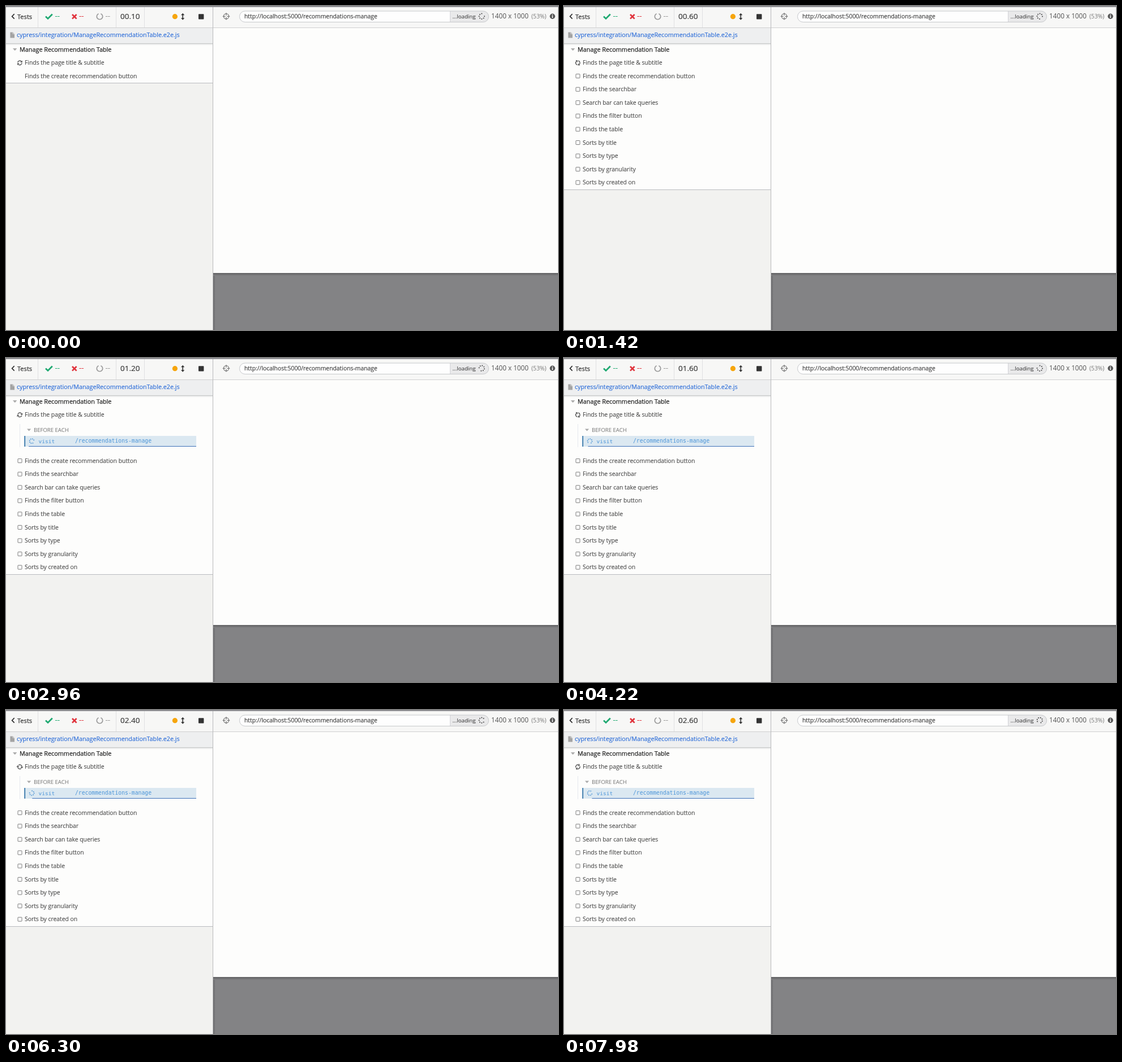
These frames come from a looping animation (975x574 px, 8000 ms). An HTML page:

```html
<!DOCTYPE html>
<html lang="en">
<head>
<meta charset="utf-8">
<title>Test runner</title>
<style>
html, body { margin: 0; width: 100%; height: 100%; overflow: hidden; background: #f2f2f0; }
svg { display: block; width: 975px; height: 574px; }
text { font-family: "Open Sans", "Noto Sans", sans-serif; white-space: pre; }
.mono { font-family: "DejaVu Sans Mono", monospace; }
</style>
</head>
<body>
<svg id="stage" viewBox="0 0 975 574" xmlns="http://www.w3.org/2000/svg"></svg>
<script>
const LOOP = 8000;
const ROW = 23.58;
const VISIT_GAP = 58;
const VISIT_FRAME = 43;
const tests = [
  'Finds the page title & subtitle', 'Finds the create recommendation button',
  'Finds the searchbar', 'Search bar can take queries', 'Finds the filter button',
  'Finds the table', 'Sorts by title', 'Sorts by type', 'Sorts by granularity',
  'Sorts by created on'
];

const esc = s => s.replace(/&/g, '&amp;');
const rect = (x, y, w, h, fill, extra = '') =>
  `<rect x="${x}" y="${y}" width="${w}" height="${h}" fill="${fill}" ${extra}/>`;
const text = (x, y, size, fill, s, extra = '') =>
  `<text x="${x}" y="${y}" font-size="${size}" fill="${fill}" ${extra}>${esc(s)}</text>`;
const line = (d, stroke, w = 1, extra = '') =>
  `<path d="${d}" fill="none" stroke="${stroke}" stroke-width="${w}" ${extra}/>`;
const shape = (d, fill) => `<path d="${d}" fill="${fill}"/>`;
const firm = (c, w = 0.25) => `stroke="${c}" stroke-width="${w}"`;

// Seven dots on a ring, with a gap at the upper right
function dots(id, r, color) {
  let s = '';
  for (let i = 0; i < 7; i++) {
    const a = i * Math.PI / 4;
    s += `<circle cx="${(r * Math.cos(a)).toFixed(2)}" cy="${(r * Math.sin(a)).toFixed(2)}" r="1"/>`;
  }
  return `<g id="${id}" fill="${color}">${s}</g>`;
}

function header() {
  return rect(0, 0, 975, 38, '#f7f7f6') + rect(0, 0, 975, 2, '#8f8f93') +
    line('M0 38.5H975', '#cfcfd0') +
    line('M56.5 2V38M194.5 2V38M244.5 2V38', '#e0e0e2') +
    line('M14.7 14.2L10.6 18.4L14.7 22.6', '#333', 1.7) +
    text(20, 22.6, 11.1, '#333', 'Tests', firm('#333')) +
    line('M70 18.6L74 22.4L81.8 14.6', '#1fa971', 2.8) +
    text(86.5, 22, 13, '#1fa971', '--', firm('#1fa971')) +
    line('M117 15L124.6 22.6M124.6 15L117 22.6', '#e0333c', 2.7) +
    text(129, 22, 13, '#e0333c', '--', firm('#e0333c')) +
    line('M163.6 13.7A5.2 5.2 0 1 0 167.4 13.7', '#999', 1.7) +
    text(175.5, 22, 13, '#999', '--', firm('#999')) +
    '<text id="clock" x="202" y="23.2" font-size="13.5" fill="#333" stroke="#333" stroke-width=".15"></text>' +
    '<circle cx="298.4" cy="18.7" r="4.6" fill="#f6a50c"/>' +
    line('M312.2 15V22.5', '#333', 1.6) +
    shape('M309 16.3L312.2 12.8L315.4 16.3ZM309 21.2L312.2 24.7L315.4 21.2Z', '#333') +
    rect(340, 14.2, 9.4, 9.4, '#333', 'rx=".8"');
}

function addressBar() {
  return '<circle cx="389" cy="18.3" r="4.6" fill="none" stroke="#777" stroke-width="1.2"/>' +
    line('M389 12V16.8M389 19.8V24.6M382.7 18.3H387.5M390.5 18.3H395.3', '#777', 1.2) +
    rect(412.5, 9, 440, 19.5, '#fefefe', 'rx="9.7"') +
    shape('M784.5 9H843A9.75 9.75 0 0 1 843 28.5H784.5Z', '#e9e9ea') +
    line('M784.5 9V28.5', '#d3d3d8') +
    rect(412.5, 9, 440, 19.5, 'none', 'rx="9.7" stroke="#c6c8cb"') +
    text(421, 22.2, 10.36, '#333', 'http://localhost:5000/recommendations-manage', firm('#333', 0.12)) +
    text(788.5, 22, 9.7, '#444', '...loading', firm('#444', 0.12)) +
    dots('loadSpin', 4.7, '#444') +
    text(857, 22.4, 11.75, '#555', '1400 x 1000') +
    text(928, 22, 10.3, '#777', '(53%)') +
    '<circle cx="965.2" cy="18.3" r="4.7" fill="#555"/>' +
    rect(964.4, 17.6, 1.7, 3.4, '#fff') + rect(964.4, 15.2, 1.7, 1.5, '#fff');
}

function fileRow() {
  return rect(0, 39, 365, 28, '#eeeff0') + rect(0, 66, 365, 1, '#c6c8c8') +
    rect(0, 67, 365, 3, 'url(#drop)') +
    shape('M7.4 46.4H12L15 49.4V56.6H7.4Z', '#a3a3a3') +
    line('M12 46.4V49.4H15', '#eee', 0.7) +
    text(19, 55.3, 10.76, '#2468d8', 'cypress/integration/ManageRecommendationTable.e2e.js', firm('#2468d8', 0.12)) +
    shape('M12 75H19.4L15.7 79.2Z', '#aaa') +
    text(24, 80.7, 10.84, '#222', 'Manage Recommendation Table', firm('#222'));
}

function refreshIcon() {
  const half = line('M-3.7 -.5A3.75 3.75 0 0 1 2.6 -2.7', '#555', 1.4) +
    shape('M4.4 -4.3V-.6H.7Z', '#555');
  return `<g id="refresh">${half}<g transform="rotate(180)">${half}</g></g>`;
}

function testRow(name, i) {
  const icon = i ? `<rect id="box${i}" x="21" y="-3.5" width="7" height="7" rx=".6" fill="none" stroke="#7c7c7c"/>` : '';
  return `<g id="test${i}">${icon}${text(33, 3.6, 10.36, '#484848', name, firm('#484848', 0.12))}</g>`;
}

function visitBlock() {
  return '<g id="visit">' + line('M24.5 117V158', '#e6e8ee') +
    shape('M37 125.4H44.2L40.6 129.4Z', '#aaa') +
    text(49, 131, 9.55, '#707070', 'BEFORE EACH') +
    rect(33, 138, 303, 19, '#dbe8f1') + rect(32.3, 138, 1.8, 19, '#3475a8') +
    rect(34, 156, 302, 1, '#3c6fb8', 'id="progress"') +
    dots('visitSpin', 4, '#5d9dd6') +
    text(57.5, 151, 9.55, '#4c95d8', 'visit', 'class="mono"') +
    text(122, 150.4, 9.75, '#4c95d8', '/recommendations-manage', 'class="mono"') + '</g>';
}

const stage = document.getElementById('stage');
stage.innerHTML = `<defs>
  <linearGradient id="shade" x2="0" y2="1"><stop stop-color="#5e5e60"/><stop offset="1" stop-color="#838385"/></linearGradient>
  <linearGradient id="side"><stop stop-color="#68686a"/><stop offset="1" stop-color="#838385"/></linearGradient>
  <linearGradient id="drop" x2="0" y2="1"><stop stop-color="#e4e5e5"/><stop offset="1" stop-color="#fdfdfc"/></linearGradient></defs>` +
  rect(0, 0, 975, 574, '#f2f2f0') +
  rect(366, 38, 609, 435, '#fdfdfc') +
  rect(366, 473, 609, 101, '#838385') + rect(366, 473, 4, 101, 'url(#side)') +
  rect(366, 473, 609, 5, 'url(#shade)') +
  rect(0, 67, 365, 70, '#fdfdfc', 'id="panel"') +
  rect(0, 136, 365, 1, '#b9bbbf', 'id="edge"') +
  header() + addressBar() + fileRow() + visitBlock() +
  tests.map(testRow).join('') + refreshIcon() +
  line('M365.5 2V574', '#b9b9bb');

const el = id => document.getElementById(id);
const set = (id, name, value) => el(id).setAttribute(name, value);
const show = (id, on) => set(id, 'visibility', on ? 'visible' : 'hidden');
const spin = (id, x, y, angle) => set(id, 'transform', `translate(${x} ${y}) rotate(${angle})`);

// Three 60 fps captures are shown for 20, 100 and 20 ms
function captureIndex(t) {
  const u = t % 140;
  return 3 * Math.floor(t / 140) + (u < 20 ? 0 : u < 120 ? 1 : 2);
}

function render(t) {
  const n = captureIndex(t);
  const sec = n / 60;
  const angle = sec * 180;
  const rows = Math.min(tests.length, 2 + n);
  const visiting = n >= VISIT_FRAME;
  const gap = visiting ? VISIT_GAP : 0;

  const tenths = Math.min(26, Math.floor((sec + 0.15) * 10));
  el('clock').textContent = (tenths / 10).toFixed(2).padStart(5, '0');

  tests.forEach((_, i) => {
    set('test' + i, 'transform', `translate(0 ${100.5 + i * ROW + (i ? gap : 0)})`);
    show('test' + i, i < rows);
    if (i) show('box' + i, i < rows - 1 || (i < rows && rows === tests.length));
  });

  const bottom = Math.round(137 + (rows - 2) * ROW + gap);
  set('panel', 'height', bottom - 67);
  set('edge', 'y', bottom - 1);
  show('visit', visiting);

  const left = 34.5 + sec * 5.25;
  set('progress', 'x', left);
  set('progress', 'width', 336 - left);

  spin('refresh', 24.4, 100.7, angle);
  spin('loadSpin', 840.3, 18.2, angle);
  spin('visitSpin', 45.6, 147.2, angle - VISIT_FRAME * 3);
}

const start = performance.now();
function tick() {
  render((performance.now() - start) % LOOP);
  requestAnimationFrame(tick);
}
tick();
</script>
</body>
</html>
```
